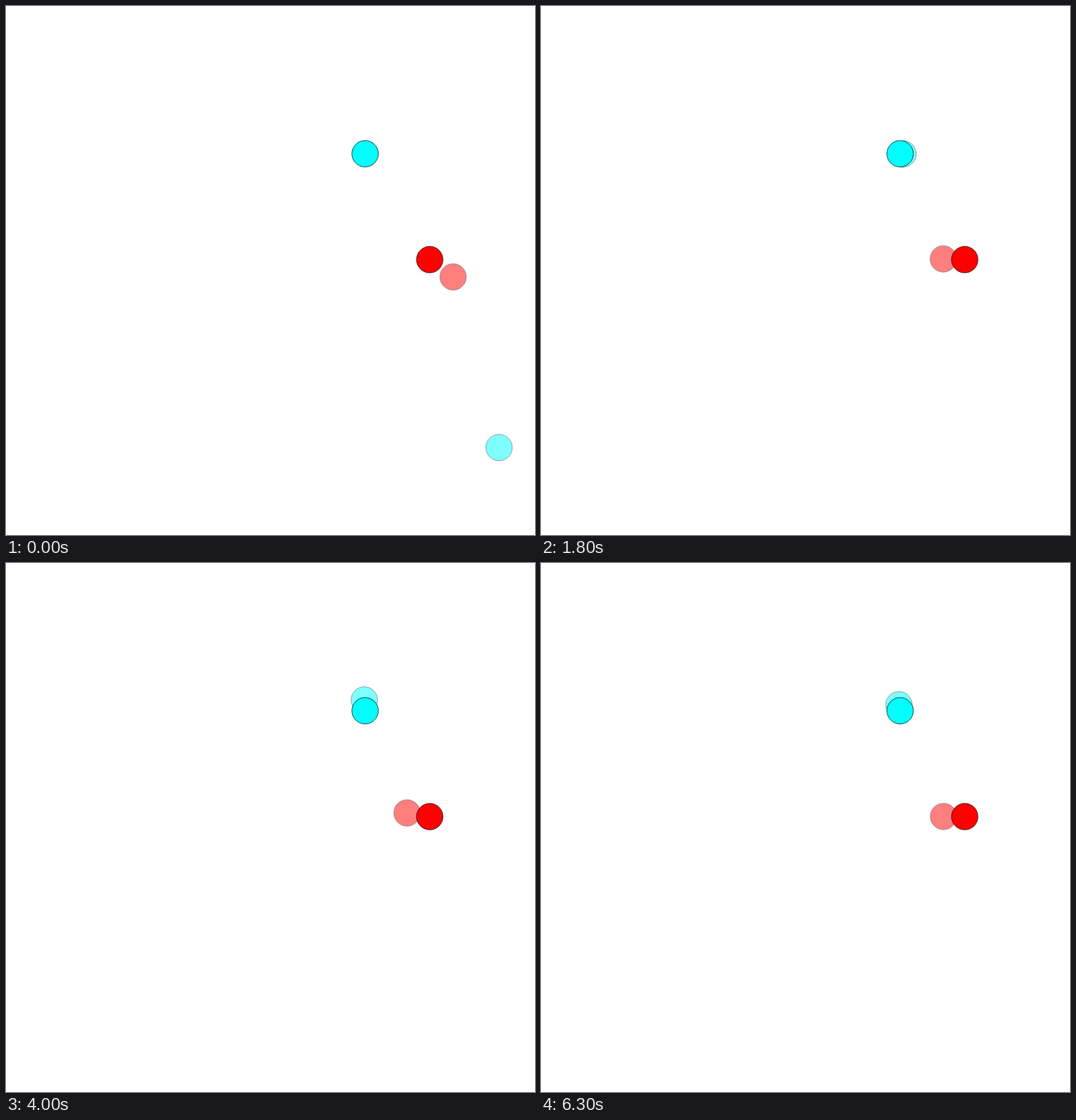
Animation, 700 px wide and 700 px high, one loop 6400 ms. Source, as an HTML page:

```html
<!DOCTYPE html>
<html lang="en">
<head>
<meta charset="utf-8">
<title>Settling dots</title>
<style>
  html, body { margin: 0; width: 100%; height: 100%; overflow: hidden; background: #fff; }
  svg { display: block; width: 100vw; height: 100vh; }
  circle { stroke: #000; stroke-opacity: .75; stroke-width: .9; }
  .cyan { fill: #0ff; }
  .red { fill: #f00; }
  .pale { opacity: .5; }
</style>
</head>
<body>
<svg viewBox="0 0 700 700">
  <circle id="paleRed" class="red pale" r="17.5"/>
  <circle id="paleCyan" class="cyan pale" r="17.5"/>
  <circle class="red" cx="560.7" cy="335.6" r="17.5"/>
  <circle class="cyan" cx="475.2" cy="195.5" r="17.5"/>
</svg>
<script>
  const STEP = 100, STEPS = 64;
  const paleRed = document.getElementById('paleRed');
  const paleCyan = document.getElementById('paleCyan');

  function place(dot, x, y) {
    dot.setAttribute('cx', x.toFixed(2));
    dot.setAttribute('cy', y.toFixed(2));
  }

  // Each dot decays towards a rest point that alternates on every step.
  function draw(ms) {
    const n = Math.floor(ms / STEP) % STEPS;
    const odd = n % 2;
    const decay = rate => Math.pow(rate, n);

    place(paleCyan,
      474.1 - 0.4 * odd + 178.4 * decay(0.819) * (odd ? 0.84 : 1),
      181 + 6.5 * odd + 403.3 * decay(0.832) * (odd ? 0.95 : 1));

    place(paleRed,
      530.6 + 2 * odd + 61 * decay(0.821),
      330.7 + 4.7 * odd + (27.8 + 15.8 * n) * decay(0.785));
  }

  let start = null;
  function tick(now) {
    if (start === null) start = now;
    draw(now - start);
    requestAnimationFrame(tick);
  }
  draw(0);
  requestAnimationFrame(tick);
</script>
</body>
</html>
```
